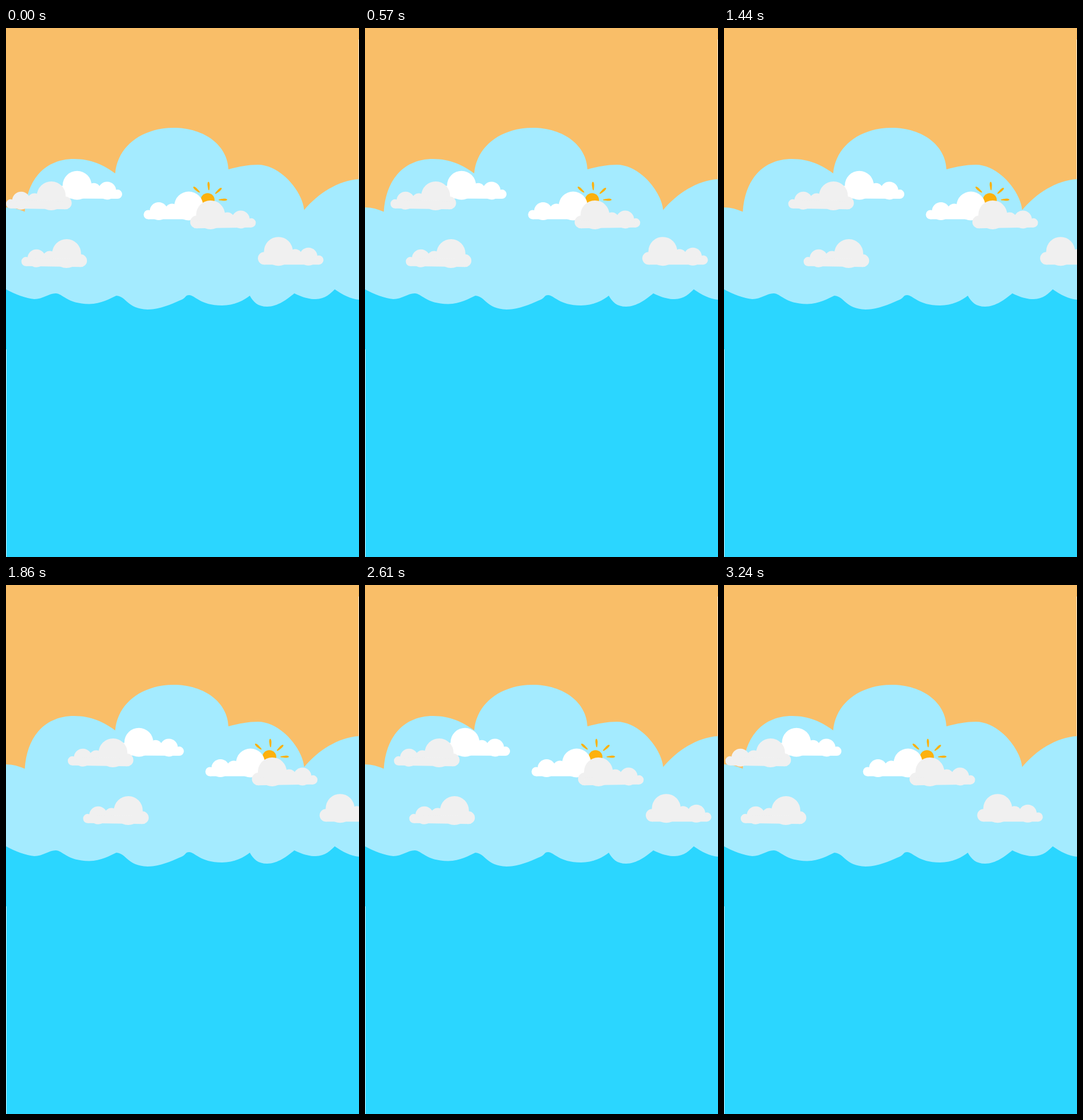
Recreate the animation shown at these times as an HTML page. Size 611 by 917 pixels, loop 3.27 s.

```html
<!DOCTYPE html>
<html lang="en">
<head>
<meta charset="utf-8">
<title>Drifting clouds</title>
<style>
  html, body { margin: 0; width: 100%; height: 100%; overflow: hidden; background: #2bd6ff; }
  svg { display: block; width: 611px; height: 917px; }
</style>
</head>
<body>
<svg viewBox="0 0 611 917">
  <defs>
    <!-- origin: left edge, bottom line -->
    <g id="cloud">
      <circle cx="11" cy="-11" r="11"/>
      <circle cx="35.5" cy="-23" r="25"/>
      <circle cx="64.5" cy="-15" r="12"/>
      <circle cx="87.5" cy="-14" r="15.5"/>
      <circle cx="105.5" cy="-8" r="8"/>
      <path d="M11 0V-14H92L105.5 -8V0Z"/>
    </g>
    <path id="ray" d="M-7.6 0C-7 -1.9 -3 -2.2 0 -1.8C3 -1.4 7.4 -1.2 7.4 0C7.4 1.2 3 1.4 0 1.8C-3 2.2 -7 1.9 -7.6 0Z"/>
  </defs>

  <rect width="611" height="917" fill="#f9be68"/>
  <rect x="610" y="20" width="1" height="245" fill="#fff" opacity=".7"/>
  <path fill="#a4ebff" d="M0 311C12 311 22 314 32.500 318.500C36 264 66 227 118 227
    C148 227 170 238 189 252C193 205 235 173 290 173C345 173 384 205 385 245
    C403 240 420 237 436 237C475 237 513 283 516 315.500C540 287 575 264 611 262V500H0Z"/>
  <path fill="#2bd6ff" d="M0 453C15 461 35 469 49 470C64 470 74 460 86 460
    C98 460 105 478 144 478.500C165 478 180 469 191 464C210 466 208 486 245 488
    C268 488 292 476 304 471C311 468 310 463 317 463C327 463 336 481 374 481
    C395 481 412 472 422 464C428 475 436 483 452 483C470 483 487 470 499 460
    C510 465 522 470 536 470C552 470 562 460 569 453C582 462 597 470 611 471V917H0Z"/>
  <rect y="557" width="1" height="360" fill="#fff" opacity=".7"/>

  <g id="drift">
    <g fill="#fdb10d">
      <circle cx="349" cy="298.300" r="12"/>
      <use href="#ray" transform="translate(330 280.300) rotate(41)"/>
      <use href="#ray" transform="translate(350.800 274) rotate(87)"/>
      <use href="#ray" transform="translate(367.600 282.300) rotate(138)"/>
      <use href="#ray" transform="translate(375.400 297.700) rotate(179)"/>
    </g>
    <g fill="#fff">
      <use href="#cloud" transform="translate(87.500 295.500) rotate(.3)"/>
      <use href="#cloud" transform="translate(351.800 331.500) scale(-1 1)"/>
    </g>
    <g fill="#f0f0f0">
      <use href="#cloud" transform="translate(113.500 314.500) scale(-1 1) rotate(-.9)"/>
      <use href="#cloud" transform="translate(140 414.500) scale(-1 1) rotate(-.9)"/>
      <use href="#cloud" transform="translate(319 347.500) rotate(-1)"/>
      <use href="#cloud" transform="translate(436 410.200)"/>
    </g>
  </g>
</svg>
<script>
  const TICK = 30, TICKS = 109, TURN = 54, REACH = 125;
  const drift = document.getElementById('drift');
  const start = performance.now();

  // Steady drift right, then back, in discrete ticks
  function offset(ms) {
    const n = Math.floor(ms / TICK) % TICKS;
    return REACH * (n <= TURN ? n / TURN : (TICKS - n) / (TICKS - TURN));
  }

  function draw(now) {
    const x = offset(Math.max(0, now - start));
    drift.setAttribute('transform', `translate(${x.toFixed(3)} 0)`);
    requestAnimationFrame(draw);
  }
  draw(start);
</script>
</body>
</html>
```
